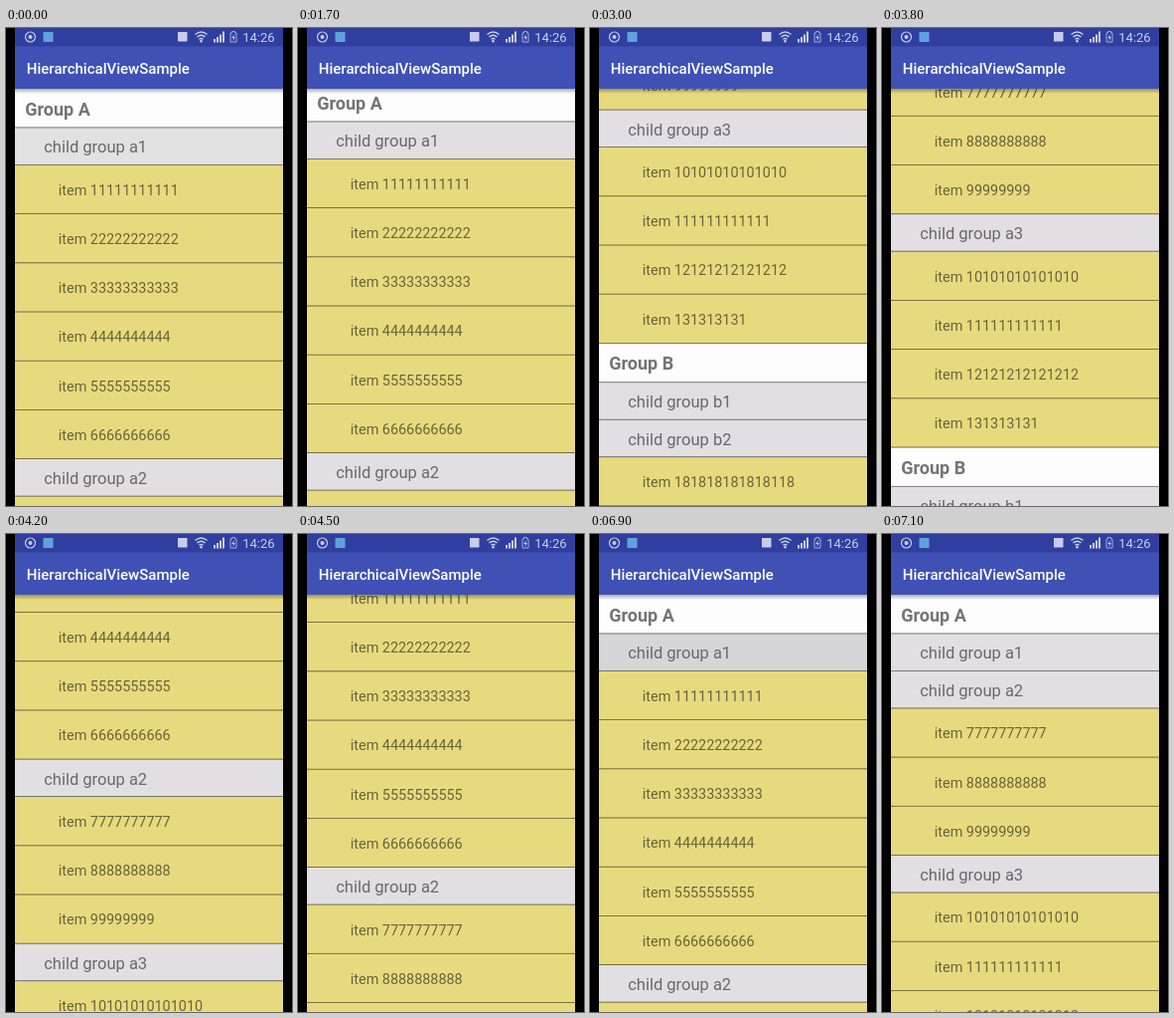
Write an HTML page that moves like this. It is 288 by 480 pixels and loops after 8000 ms.

```html
<!DOCTYPE html>
<html lang="en">
<head>
<meta charset="utf-8">
<title>Hierarchical list</title>
<style>
html, body { margin: 0; height: 100%; overflow: hidden; background: #000; }
svg { display: block; width: 288px; height: 480px; font-family: Roboto, sans-serif; }
.group text { font-size: 18px; font-weight: 700; fill: #747474; }
.child text { font-size: 16.5px; fill: #69686a; }
.item text { font-size: 14.4px; fill: #6a633b; }
.group .bg { fill: #fdfdfd; }
.child .bg { fill: #e1dfe2; }
.item .bg { fill: #e7da7e; }
.line { fill: #000; fill-opacity: .6; }
</style>
</head>
<body>
<svg viewBox="0 0 288 480">
  <defs>
    <linearGradient id="shade" x2="0" y2="1">
      <stop stop-opacity=".32"/>
      <stop offset="1" stop-opacity="0"/>
    </linearGradient>
    <clipPath id="screen"><rect x="9" y="61" width="270" height="419"/></clipPath>
  </defs>
  <rect width="288" height="480"/>
  <g clip-path="url(#screen)"><g id="list"></g></g>
  <rect x="9" y="61" width="270" height="5" fill="url(#shade)"/>
  <rect x="9" width="270" height="61" fill="#3f51b5"/>
  <rect x="9" width="270" height="18.5" fill="#303f9f"/>
  <text x="20.8" y="45.5" font-size="15" font-weight="500" fill="#fff">HierarchicalViewSample</text>
  <g fill="#c9cdea">
    <circle cx="24.5" cy="9" r="5" fill="none" stroke="#c9cdea" stroke-width="1.2"/>
    <circle cx="24.5" cy="9" r="2"/>
    <rect x="37.5" y="4" width="10" height="10" fill="#5fa3dc"/>
    <rect x="173" y="4" width="9.5" height="9.5"/>
    <path d="M190.5 6.5Q196.5 1.5 202.5 6.5M192.5 9Q196.5 5.5 200.5 9M194.5 11.3Q196.5 9.6 198.5 11.3" fill="none" stroke="#c9cdea" stroke-width="1.5"/>
    <circle cx="196.5" cy="13.3" r="1.3"/>
    <path d="M209 11h2v3.5h-2zM212 9h2v5.5h-2zM215 6.5h2v8h-2zM218 3.5h2v11h-2z"/>
    <path d="M227.5 3.5h3v1.5h1.500v9h-6v-9h1.500z" fill="none" stroke="#a3abd6"/>
    <path d="M229.800 6l-2.500 4h1.700l-.6 3 2.500-4h-1.700z"/>
    <text x="238.200" y="14" font-size="13">14:26</text>
  </g>
</svg>
<script>
const NS = 'http://www.w3.org/2000/svg';
const KINDS = {
  group: { height: 39.3, x: 19.3, base: 26.6 },
  child: { height: 37.5, x: 38.2, base: 25.1 },
  item: { height: 49.2, x: 52.8, base: 30.1 }
};
const FOLD = 6 * KINDS.item.height;
const END = 535.6;
const list = document.getElementById('list');
let nextTop = 61;

function add(parent, tag, attrs = {}, text = '') {
  const el = parent.appendChild(document.createElementNS(NS, tag));
  for (const name in attrs) el.setAttribute(name, attrs[name]);
  el.textContent = text;
  return el;
}

function row(parent, kind, label) {
  const { height, x, base } = KINDS[kind];
  const g = add(parent, 'g', { class: kind, transform: `translate(0 ${nextTop})` });
  const bg = add(g, 'rect', { class: 'bg', x: 9, width: 270, height });
  add(g, 'rect', { class: 'line', x: 9, y: height - .8, width: 270, height: .8 });
  add(g, 'text', { x, y: base }, label);
  nextTop += height;
  return bg;
}

const items = (parent, labels) =>
  labels.split(' ').forEach(label => row(parent, 'item', 'item ' + label));

const head = add(list, 'g');
const folding = add(list, 'g');
const rest = add(list, 'g');

row(head, 'group', 'Group A');
const firstChild = row(head, 'child', 'child group a1');
items(folding, '11111111111 22222222222 33333333333 4444444444 5555555555 6666666666');
row(rest, 'child', 'child group a2');
items(rest, '7777777777 8888888888 99999999');
row(rest, 'child', 'child group a3');
items(rest, '10101010101010 111111111111 12121212121212 131313131');
row(rest, 'group', 'Group B');
row(rest, 'child', 'child group b1');
row(rest, 'child', 'child group b2');
items(rest, '181818181818118');

// Scroll positions, one per 100 ms step.
const down = [6, 22, 46, 80, 122.5, 270, 420, END];
const up = [518, 480, 431, 368, 308, 254, 206.5, 165, 129, 98, 72, 50, 33, 19, 9, 3, 0];

function scrollAt(step) {
  if (step < 17) return 0;
  if (step < 36) return down[Math.min(step - 17, down.length - 1)];
  return up[Math.min(step - 36, up.length - 1)];
}

function draw(now) {
  const step = Math.floor(now % 8000 / 100);
  const folded = step >= 71;
  const pressed = step >= 69 && !folded;
  list.setAttribute('transform', `translate(0 ${-scrollAt(step)})`);
  folding.setAttribute('visibility', folded ? 'hidden' : 'visible');
  rest.setAttribute('transform', `translate(0 ${folded ? -FOLD : 0})`);
  firstChild.style.fill = pressed ? '#d6d5d7' : step < 11 ? '#e0e1e0' : '';
  requestAnimationFrame(draw);
}
draw(performance.now());
</script>
</body>
</html>
```
